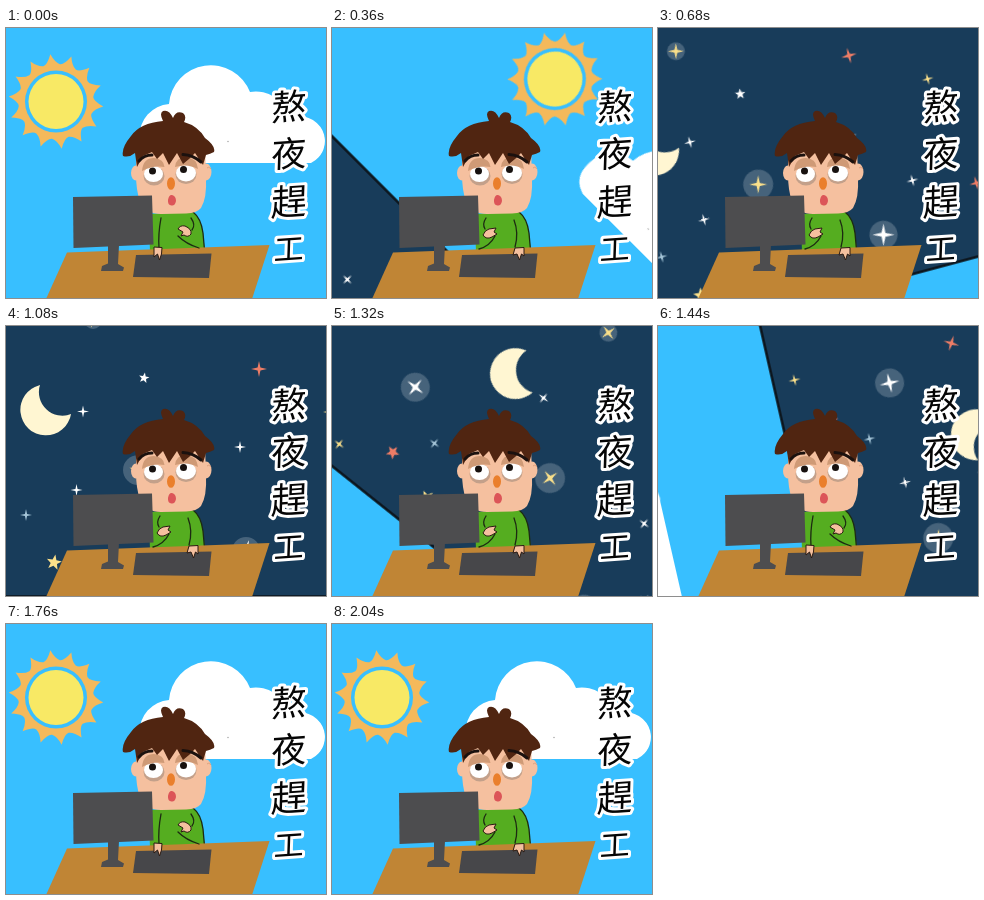
These frames come from a looping animation (320x270 px, 2.16 s). An HTML page:

```html
<!DOCTYPE html>
<html lang="zh-Hant">
<head>
<meta charset="utf-8">
<title>熬夜趕工</title>
<style>
  html, body { margin: 0; width: 100%; height: 100%; overflow: hidden; background: #38bfff; }
  svg { display: block; width: 320px; height: 270px; }
  #wheel { transform-origin: 163.5px 271px; }
  .title text {
    font: 500 34px "Noto Sans CJK TC", "Noto Sans CJK", "Noto Sans CJK SC", "Noto Sans CJK JP", sans-serif;
    text-anchor: middle; dominant-baseline: central;
    fill: #050505; stroke: #fff; stroke-width: 6px; stroke-linejoin: round; paint-order: stroke;
  }
  .line { fill: none; stroke: #1d2a12; stroke-width: 1.3; stroke-linecap: round; stroke-linejoin: round; }
  .hand { fill: #f5c09f; stroke: #2a1a12; stroke-width: 1; stroke-linejoin: round; }
</style>
</head>
<body>
<svg viewBox="0 0 320 270">
  <g id="wheel">
    <!-- day half -->
    <rect x="-240" y="-130" width="800" height="402" fill="#38bfff"/>
    <g id="sun" transform="translate(50 73.5)"></g>
    <g fill="#fff">
      <path d="M151 135C138 131 133 122 133.500 109A32 32 0 0 1 163 76A42 42 0 0 1 244 64A35 35 0 0 1 284 91A23 23 0 0 1 305 135Z"/>
      <circle cx="296" cy="113" r="22.500"/>
    </g>
    <circle cx="222" cy="113.500" r=".7" fill="#999"/>
    <!-- night half -->
    <g transform="rotate(180 163.500 271)">
      <path d="M-240 270.500V-130H560V270.500Z" fill="#183c5a" stroke="#0b1218" stroke-width="2.400"/>
      <path d="M34 59A25.500 25.500 0 1 0 65 88A23.500 23.500 0 0 1 34 59Z" fill="#fff6d2"/>
      <g id="stars"></g>
    </g>
  </g>

  <!-- worker -->
  <path d="M143 186L187 184Q195 190 197 205L199 224L144 226Z" fill="#55ad20"/>
  <path class="line" d="M187 184Q195 190 197 205L198.500 222"/>
  <g fill="#f5c09f">
    <ellipse cx="200" cy="144" rx="5.500" ry="8.500"/>
    <ellipse cx="130" cy="145" rx="5" ry="7.500"/>
    <path d="M130 118H199L200 150Q201 170 195 180Q191 185 180 185.500L155 186Q140 186 134 173Q130 163 130 145Z"/>
  </g>
  <path d="M201 140Q204 138 204.500 141" fill="none" stroke="#d99a76" stroke-width=".8"/>
  <g fill="#c3a08a">
    <ellipse cx="148" cy="148" rx="10.500" ry="9.500"/>
    <ellipse cx="180" cy="146.500" rx="10.500" ry="9.500"/>
  </g>
  <g fill="#fff">
    <ellipse cx="147.500" cy="146" rx="9.500" ry="8"/>
    <ellipse cx="180" cy="145" rx="10" ry="8.500"/>
  </g>
  <g fill="#17110f">
    <circle cx="146.500" cy="143" r="3.500"/>
    <circle cx="177.500" cy="141.500" r="3.500"/>
  </g>
  <g fill="#cf9a76">
    <path d="M136 143Q137 130 148 130Q158 131 158.500 139Q147 137 136 143Z"/>
    <path d="M169 139Q170 129 180 129Q191 130 192 141Q181 135 169 139Z"/>
  </g>
  <ellipse cx="165" cy="155.500" rx="4" ry="6.300" fill="#ea7f2c"/>
  <path d="M162 172Q163 166.500 166 167Q170 168 170 173Q169 178 165.500 177.500Q161.500 177 162 172Z" fill="#dc5558"/>
  <path d="M117 128Q115 120 125 108Q134 95 157 93Q153 85 157 83Q163 81 167 90Q170 82 177 85Q181 88 178 94Q192 98 199 110Q210 118 208 124Q204 126 200 127L197 137L189 125L183 131L177 136L171 125L163 137L157 125L151 131L146 124L137 128L131 139L129 125Q123 130 117 128Z" fill="#502511"/>
  <g fill="none" stroke="#1b110e" stroke-width="3" stroke-linecap="round">
    <path d="M133 133Q138 127 146 127"/>
    <path d="M177 126.500Q187 127 195 134"/>
  </g>

  <!-- desk -->
  <path d="M61 224.500L263.500 217L246 271H40Z" fill="#c08535"/>
  <path d="M130 227L205.500 225.500L203 250L127 249Z" fill="#47474a"/>

  <g id="leftDown">
    <path class="line" d="M155 190Q152 206 153 220M185 190Q190 197 186 202M172 208Q180 216 193 220"/>
    <path class="hand" d="M148 219L156 219.500L155.500 226L153.500 232L151.500 226L148 229Z"/>
    <path class="hand" d="M172 201Q174 197 179 198Q186 201 185 206Q182 210 178 207L175 208L177 204Z"/>
  </g>
  <g id="rightDown">
    <path class="line" d="M154 190Q150 196 153 201M163 208Q158 218 147 221M182 192Q187 205 183 219"/>
    <path class="hand" d="M151 207Q153 202 157 201L164 200L162 204L165 206L160 209Q154 212 151 207Z"/>
    <path class="hand" d="M183 220L192 219.500L192 228L189.500 226L187.500 232L185 226L181 227Z"/>
  </g>

  <g fill="#4d4d4f">
    <path d="M67 169L146 167.500L147.500 216.500L67.500 220Z"/>
    <path d="M102 217H113L112 236L118 239.500L117 243H95L96 238L102 235.500Z"/>
  </g>

  <g class="title" id="title"></g>
</svg>
<script>
const LOOP = 2160;
const $ = id => document.getElementById(id);

function add(parent, tag, attrs) {
  const el = document.createElementNS("http://www.w3.org/2000/svg", tag);
  for (const key in attrs) el.setAttribute(key, attrs[key]);
  parent.appendChild(el);
  return el;
}

const polar = (r, a) => `${(r * Math.cos(a)).toFixed(2)} ${(r * Math.sin(a)).toFixed(2)}`;

// Sun: spiked ring around a disc
const SPIKES = 14, turn = 2 * Math.PI / SPIKES;
let rays = "";
for (let i = 0; i < SPIKES; i++) {
  const a = i * turn - 1.69;
  rays += `${i ? "L" : "M"}${polar(47.5, a)}Q${polar(39, a + turn * .2)} ${polar(37.5, a + turn * .5)}` +
          `Q${polar(37.5, a + turn * .75)} ${polar(47.5, a + turn)}`;
}
add($("sun"), "path", { d: rays + "Z", fill: "#f4b95b" });
add($("sun"), "circle", { r: 31, fill: "#38bfff" });
add($("sun"), "circle", { r: 27.5, fill: "#f8e965" });

function starPath(points, outer, inner) {
  let d = "";
  for (let i = 0; i < points * 2; i++) {
    d += (i ? "L" : "M") + polar(i % 2 ? inner : outer, i * Math.PI / points - Math.PI / 2);
  }
  return d + "Z";
}

const WHITE = "#fff", GOLD = "#fbe08a", RED = "#ee7d66", DIM = "#a5c5d8";
// x, y, points, radius, colour, glow radius, tilt
const stars = [
  [87, -6, 4, 8, GOLD, 9, 15],
  [138, 52, 5, 5.5, WHITE, 0, 10],
  [253, 43, 4, 8, RED, 0, 0],
  [77, 85.5, 4, 6, WHITE, 0, 0],
  [70.5, 164, 4, 6, WHITE, 0, 0],
  [20, 189, 4, 6, DIM, 0, 0],
  [132, 144, 4, 9, GOLD, 15, 15],
  [240, 225, 4, 11, WHITE, 14, 15],
  [282, 180, 4, 6, WHITE, 0, 0],
  [234, 121, 4, 6, WHITE, 0, 0],
  [323, 86, 4, 6, GOLD, 0, 0],
  [343, 199, 4, 7, RED, 0, 0],
  [48, 236.5, 5, 8, GOLD, 0, 10],
  [-54, 249, 4, 6, GOLD, 0, 0],
  [-30, 157, 4, 10, WHITE, 14.5, 0],
  [-55, 88, 4, 8, RED, 0, 30],
  [-7, 222, 5, 7, RED, 0, 0]
];
for (const [x, y, points, r, fill, glow, tilt] of stars) {
  if (glow) add($("stars"), "circle", { cx: x, cy: y, r: glow, fill: WHITE, opacity: .2 });
  add($("stars"), "path", {
    d: starPath(points, r, r * (points === 4 ? .25 : .42)), fill,
    transform: `translate(${x} ${y}) rotate(${tilt})`
  });
}

// Vertical title
[["熬", 76, 35], ["夜", 123, 35], ["趕", 171, 36], ["工", 219, 30]].forEach(([char, y, size]) => {
  const t = add($("title"), "text", { transform: `translate(283 ${y}) rotate(-4) skewX(-6)` });
  t.style.fontSize = size + "px";
  t.textContent = char;
});

// A tiny lead keeps each step on the right side of its boundary
const play = (id, frames, duration, easing = "linear") =>
  $(id).animate(frames, { duration, easing, delay: -1, iterations: Infinity });

const spin = (ms, deg, easing = "linear") =>
  ({ offset: ms / LOOP, transform: `rotate(${deg}deg)`, easing });
play("wheel", [
  spin(0, 0), spin(240, 0, "steps(12)"), spin(720, 180),
  spin(1200, 180, "steps(14)"), spin(1760, 360), spin(LOOP, 360)
], LOOP);

play("leftDown", { opacity: [1, 0] }, 240, "steps(2, jump-none)");
play("rightDown", { opacity: [0, 1] }, 240, "steps(2, jump-none)");
</script>
</body>
</html>
```
